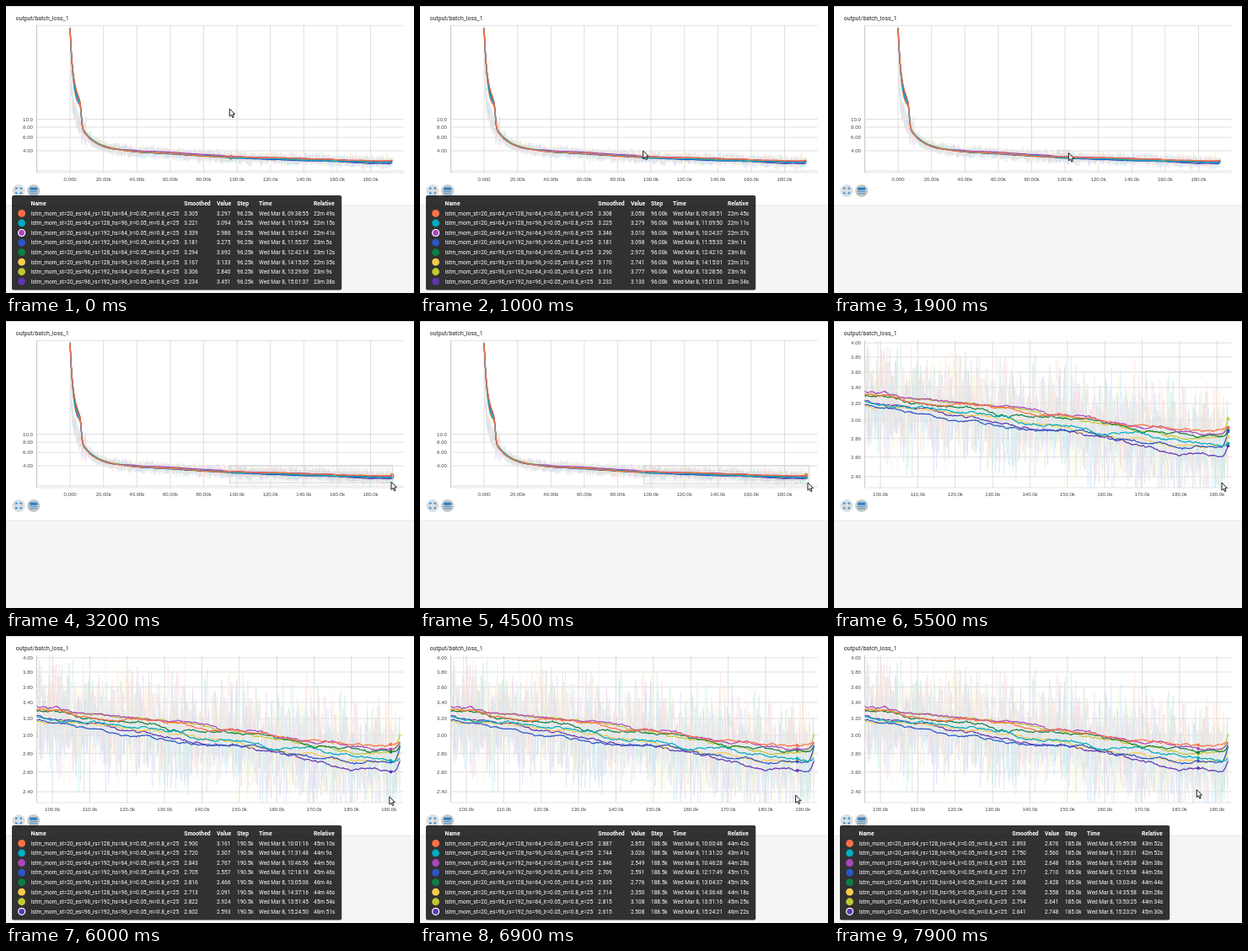
An HTML page with a canvas for the animation above (8000 ms loop, 484 by 341 pixels).

```html
<!DOCTYPE html>
<html lang="en">
<head>
<meta charset="utf-8">
<title>Batch loss chart</title>
<style>
html, body { margin: 0; width: 100%; height: 100%; overflow: hidden; background: #fff; }
canvas { display: block; width: 484px; height: 341px; }
</style>
</head>
<body>
<canvas id="stage"></canvas>
<script>
const W = 484, H = 341, LOOP = 8000, FRAME = 100;
const canvas = document.getElementById('stage');
const dpr = window.devicePixelRatio || 1;
canvas.width = W * dpr;
canvas.height = H * dpr;
const ctx = canvas.getContext('2d');

const PLOT = { l: 36.5, r: 471.5, t: 23, b: 198 };
const HOME = { x0: -20, x1: 199.7, y0: 1.873, y1: 100.5 };
const ZOOMED = { x0: 95.8, x1: 193.9, y0: 2.294, y1: 4.036 };
const ZOOM_START = 4680, ZOOM_TIME = 750;
const HIDE_TIP = 1500, DRAG_START = 1800, SHOW_TIP = 5600;

// Steps are counted in thousands; each run is known at MID and END.
const STEP = 0.25, LAST = 193, MID = 96.25, END = 188.5;
const RUNS = [
  { color: '#ff7043', start: '9:16:06', time: ['22:49', '44:42'], loss: [3.305, 2.887] },
  { color: '#00acc1', start: '10:47:39', time: ['22:15', '43:41'], loss: [3.221, 2.744] },
  { color: '#ab47bc', start: '10:02:00', time: ['22:41', '44:28'], loss: [3.339, 2.846] },
  { color: '#2a56c6', start: '11:32:32', time: ['23:05', '45:17'], loss: [3.181, 2.709] },
  { color: '#0b8043', start: '12:19:02', time: ['23:12', '45:35'], loss: [3.294, 2.835] },
  { color: '#f7cb4d', start: '13:52:30', time: ['22:35', '44:18'], loss: [3.167, 2.714] },
  { color: '#c0ca33', start: '13:05:51', time: ['23:09', '45:25'], loss: [3.306, 2.815] },
  { color: '#5e35b1', start: '14:37:59', time: ['23:38', '46:22'], loss: [3.234, 2.615] }
];

// Pointer path: time, x, y.
const PATH = [
  [0, 266.7, 123.5], [1000, 266.2, 173.5], [1800, 266.2, 173.5], [2700, 389, 197],
  [3200, 458.5, 192.7], [3600, 461.5, 193.5], [5500, 461.5, 193.5], [6900, 447.1, 190.5], [7900, 431.7, 184]
];

const lerp = (a, b, p) => a + (b - a) * p;
const clamp = (v, a, b) => Math.min(b, Math.max(a, v));
const progress = k => (k - MID) / (END - MID);
const seconds = str => str.split(':').reduce((sum, part) => sum * 60 + Number(part), 0);

// Log scale that flattens below ten.
const toLog = v => Math.log(v < 10 ? 0.9 * v + 1 : v);
const fromLog = f => f < Math.log(10) ? (Math.exp(f) - 1) / 0.9 : Math.exp(f);

function seeded(seed) {
  return () => {
    seed = (seed + 0x6D2B79F5) | 0;
    let t = Math.imul(seed ^ (seed >>> 15), 1 | seed);
    t = (t + Math.imul(t ^ (t >>> 7), 61 | t)) ^ t;
    return ((t ^ (t >>> 14)) >>> 0) / 4294967296;
  };
}

function tint(hex, p) {
  const mix = [1, 3, 5].map(i => Math.round(lerp(255, parseInt(hex.slice(i, i + 2), 16), p)));
  return `rgb(${mix})`;
}

// First half: a steep fall, a shoulder that breaks near 6.7k, then a long tail.
const tail = k => 1.368 + 0.0023 * (96 - k) + 1.26 * Math.exp(-k / 7.6);
const shoulder = k => 0.6 / (1 + Math.exp((k - 6.7) / 0.3)) + 1.08 * Math.exp(-k / 1.3);

// Second half: an even descent that levels out near 180k.
const descent = (run, k) => lerp(...run.loss, clamp((k - MID) / (180 - MID), 0, 1));

function buildRun(run, index) {
  const rnd = seeded(91 + index * 37);
  const own = toLog(run.loss[0]) - tail(MID);
  const sag = 0.35 * rnd() * (index ? 1 : 0);
  const kick = 0.005 + 0.04 * rnd();
  const drift = [], raw = [];
  let ema = 0;
  for (let k = 0; k <= LAST; k += STEP) {
    const noise = (rnd() + rnd() + rnd() + rnd() - 2) * 0.12;
    const center = k < MID
      ? tail(k) + own * k / MID + 1.8 * Math.exp(-k / 0.6)
      : toLog(descent(run, k));
    raw.push(center + noise * (k < 10 ? 2 : 1));
    ema = lerp(ema, noise, 0.018);
    drift.push(ema);
  }
  const line = drift.map((d, i) => {
    const k = i * STEP;
    const base = k < MID
      ? tail(k) + own * k / MID + shoulder(k) - (k < 7 ? sag * Math.sin(Math.PI * k / 7) : 0)
      : toLog(descent(run, k));
    const pin = lerp(drift[MID / STEP], drift[END / STEP], clamp(progress(k), 0, 1));
    const curl = k > 191 ? kick * ((k - 191) / 2) ** 2 : 0;
    return base + d - pin + curl;
  });
  const name = `lstm_mom_st=20_es=${index & 4 ? 96 : 64}_rs=${index & 2 ? 192 : 128}` +
    `_hs=${index & 1 ? 96 : 64}_lr=0.05_m=0.8_e=25`;
  return { ...run, name, line, raw, faint: tint(run.color, 0.22) };
}
const runs = RUNS.map(buildRun);
const backToFront = [...runs].reverse();

function viewAt(t) {
  const p = clamp((t - ZOOM_START) / ZOOM_TIME, 0, 1);
  const e = p < 0.5 ? 4 * p ** 3 : 1 - 4 * (1 - p) ** 3;
  const v = {};
  for (const key in HOME) v[key] = lerp(HOME[key], ZOOMED[key], e);
  const lo = toLog(v.y0), hi = toLog(v.y1);
  v.x = k => PLOT.l + (k - v.x0) / (v.x1 - v.x0) * (PLOT.r - PLOT.l);
  v.y = f => PLOT.b - (f - lo) / (hi - lo) * (PLOT.b - PLOT.t);
  return v;
}

function pointerAt(t) {
  const i = clamp(PATH.findIndex(key => key[0] > t), 1, PATH.length - 1);
  const [a, b] = t >= PATH[PATH.length - 1][0] ? PATH.slice(-1).concat(PATH.slice(-1)) : [PATH[i - 1], PATH[i]];
  const p = b[0] > a[0] ? (t - a[0]) / (b[0] - a[0]) : 0;
  return [lerp(a[1], b[1], p), lerp(a[2], b[2], p)];
}

function text(str, x, y, font, color, align = 'left') {
  ctx.font = font;
  ctx.fillStyle = color;
  ctx.textAlign = align;
  ctx.fillText(str, x, y);
}

function segment(x0, y0, x1, y1, color, width) {
  ctx.strokeStyle = color;
  ctx.lineWidth = width;
  ctx.beginPath();
  ctx.moveTo(x0, y0);
  ctx.lineTo(x1, y1);
  ctx.stroke();
}

function dot(x, y, r, color) {
  ctx.fillStyle = color;
  ctx.beginPath();
  ctx.arc(x, y, r, 0, 7);
  ctx.fill();
}

function tickStep(span) {
  const step = 10 ** Math.floor(Math.log10(span / 10));
  const err = step * 10 / span;
  return step * (err <= 0.15 ? 10 : err <= 0.35 ? 5 : err <= 0.75 ? 2 : 1);
}

function ticks(lo, hi, step) {
  const out = [];
  for (let i = Math.ceil(lo / step); i * step <= hi; i++) out.push(i * step);
  return out;
}

function drawAxes(v) {
  const font = '6px "Liberation Sans", Arial, sans-serif';
  const grid = '#d6d6d6', ink = '#444';
  for (const k of ticks(v.x0, v.x1, tickStep(v.x1 - v.x0))) {
    const x = v.x(k);
    segment(x, PLOT.t, x, PLOT.b, grid, 0.8);
    const label = k === 0 ? '0.000' : k.toPrecision(4) + 'k';
    ctx.font = font;
    const half = ctx.measureText(label).width / 2;
    if (x - half > 34 && x + half < PLOT.r) text(label, x, 208, font, ink, 'center');
  }
  const levels = v.y1 > 8 ? [2, 4, 6, 8, 10, 100]
    : ticks(v.y0, v.y1, v.y1 - v.y0 > 3 ? 0.5 : 0.2);
  for (const n of levels) {
    const y = v.y(toLog(n));
    if (y < PLOT.t - 0.5 || y > PLOT.b) continue;
    segment(PLOT.l, y, PLOT.r, y, grid, 0.8);
    if (y > 25 && y < 193) text(n.toPrecision(3), 31.8, y + 2.3, font, ink, 'right');
  }
  segment(PLOT.l, PLOT.t, PLOT.l, PLOT.b, '#c4c4c4', 0.9);
  segment(PLOT.l, PLOT.b, PLOT.r, PLOT.b, '#dcdcdc', 0.8);
}

function drawLine(data, v, color, width, alpha) {
  const from = Math.max(0, Math.floor(v.x0 / STEP) - 1);
  ctx.globalAlpha = alpha;
  ctx.strokeStyle = color;
  ctx.lineWidth = width;
  ctx.beginPath();
  for (let i = from; i < data.length; i++) ctx.lineTo(v.x(i * STEP), v.y(data[i]));
  ctx.stroke();
  ctx.globalAlpha = 1;
}

function drawRuns(v, step) {
  ctx.save();
  ctx.beginPath();
  ctx.rect(PLOT.l, PLOT.t, PLOT.r - PLOT.l, PLOT.b - PLOT.t);
  ctx.clip();
  ctx.lineJoin = 'round';
  backToFront.forEach(r => drawLine(r.raw, v, r.faint, 0.7, 0.7));
  backToFront.forEach(r => drawLine(r.line, v, r.color, 1.2, 1));
  ctx.restore();
  backToFront.forEach(r => dot(v.x(step), v.y(r.line[step / STEP]), 1.9, r.color));
}

function drawButtons() {
  dot(15, 219.5, 7.6, '#dadfe2');
  dot(32.7, 219.5, 7.6, '#c6c8c8');
  ctx.strokeStyle = '#1e82d2';
  ctx.lineWidth = 1.2;
  ctx.beginPath();
  for (const sx of [-1, 1]) for (const sy of [-1, 1]) {
    ctx.moveTo(15 + sx * 1.3, 219.5 + sy * 3.2);
    ctx.lineTo(15 + sx * 3.2, 219.5 + sy * 3.2);
    ctx.lineTo(15 + sx * 3.2, 219.5 + sy * 1.3);
  }
  ctx.stroke();
  ctx.fillStyle = '#2b7fc3';
  ctx.fillRect(28.2, 215.6, 9, 3.2);
  for (const y of [220.5, 222.9]) segment(28.2, y, 37.2, y, '#4a90c8', 1);
}

function clock(sec) {
  return [sec / 3600, sec / 60 % 60, sec % 60]
    .map(n => String(Math.floor(n)).padStart(2, '0')).join(':');
}

function drawTooltip(step, hovered) {
  ctx.fillStyle = 'rgba(0,0,0,0.8)';
  ctx.beginPath();
  ctx.roundRect(7, 225, 391.2, 112.6, 2);
  ctx.fill();
  const cols = [29.6, 211.3, 250, 274, 300, 365];
  const row = (cells, y, font) => cells.forEach((c, i) => text(c, cols[i], y, font, '#fff'));
  row(['Name', 'Smoothed', 'Value', 'Step', 'Time', 'Relative'], 237.3, 'bold 6.8px Roboto, sans-serif');
  runs.forEach((run, i) => {
    const y = 246.4 + i * 11.56;
    const sec = lerp(...run.time.map(seconds), progress(step)) + 0.3;
    dot(18.6, y, 4.4, run.color);
    if (run === hovered) {
      ctx.strokeStyle = '#fff';
      ctx.lineWidth = 1.2;
      ctx.beginPath();
      ctx.arc(18.6, y, 4, 0, 7);
      ctx.stroke();
    }
    row([
      run.name,
      fromLog(run.line[step / STEP]).toFixed(3),
      fromLog(run.raw[step / STEP]).toFixed(3),
      step.toPrecision(4) + 'k',
      'Wed Mar 8, ' + clock(seconds(run.start) + sec),
      `${Math.floor(sec / 60)}m ${Math.floor(sec % 60)}s`
    ], y + 2.3, '6.49px Roboto, sans-serif');
  });
}

function drawSelection(x, y) {
  const left = 265.5, top = 171.8;
  ctx.fillStyle = 'rgba(0,0,0,0.03)';
  ctx.strokeStyle = '#ccc';
  ctx.lineWidth = 0.7;
  ctx.fillRect(left, top, x - left, y - top);
  ctx.strokeRect(left, top, x - left, y - top);
}

function drawCursor(x, y) {
  const shape = [[0, 0], [0, 9.2], [2.1, 7.3], [3.6, 10.6], [5, 10], [3.6, 6.8], [6.4, 6.6]];
  ctx.beginPath();
  shape.forEach(([dx, dy]) => ctx.lineTo(x - 1.5 + dx, y - 1.5 + dy));
  ctx.closePath();
  ctx.lineJoin = 'miter';
  ctx.fillStyle = '#fff';
  ctx.strokeStyle = '#1c1c1c';
  ctx.lineWidth = 1;
  ctx.fill();
  ctx.stroke();
}

function draw(t) {
  const v = viewAt(t);
  const [cx, cy] = pointerAt(t);
  // The picked step follows the pointer, except while the view zooms.
  const pick = t >= SHOW_TIP ? v : HOME;
  const k = lerp(pick.x0, pick.x1, (cx - PLOT.l) / (PLOT.r - PLOT.l));
  const step = Math.min(LAST, Math.round(k / STEP) * STEP);

  ctx.setTransform(dpr, 0, 0, dpr, 0, 0);
  ctx.fillStyle = '#fff';
  ctx.fillRect(0, 0, W, 237);
  ctx.fillStyle = '#f5f5f5';
  ctx.fillRect(0, 237, W, H - 237);
  segment(0, 0.5, W, 0.5, '#e0e0e0', 1);
  segment(0, 237, W, 237, '#e2e2e2', 0.8);

  text('output/batch_loss_1', 11.7, 16.6, '6.9px Roboto, sans-serif', '#222');
  drawAxes(v);
  drawRuns(v, step);
  if (t >= DRAG_START && t < ZOOM_START) drawSelection(cx, cy);
  drawButtons();
  if (t < HIDE_TIP || t >= SHOW_TIP) {
    const gap = run => Math.abs(v.y(run.line[step / STEP]) - cy);
    drawTooltip(step, runs.reduce((a, b) => gap(b) < gap(a) ? b : a));
  }
  drawCursor(cx, cy);
}

const begin = performance.now();
function tick() {
  const t = (performance.now() - begin) % LOOP;
  draw(Math.floor(t / FRAME) * FRAME);
  requestAnimationFrame(tick);
}
tick();
</script>
</body>
</html>
```
